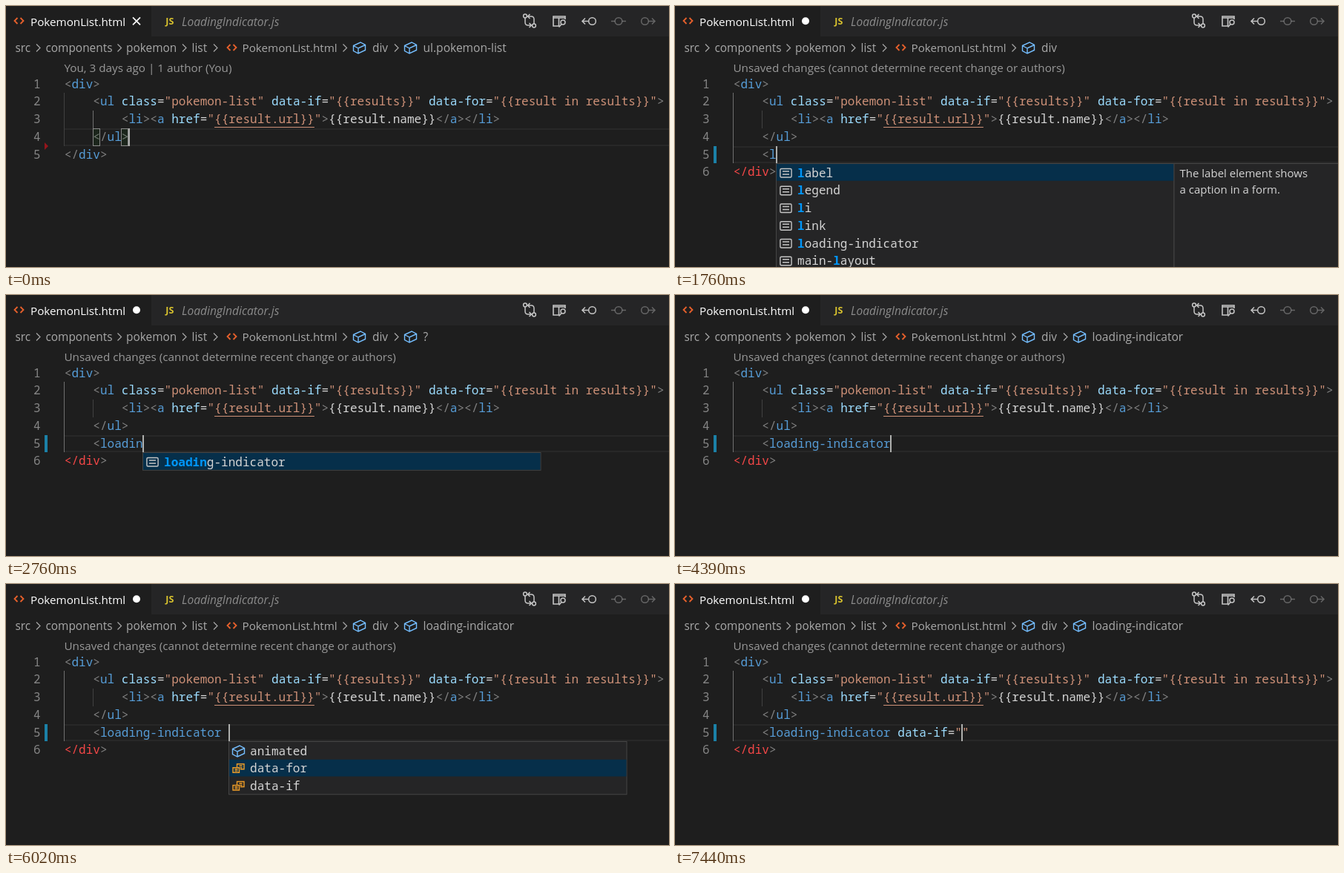
An HTML page for the animation above (7990 ms loop, 894 by 352 pixels).

```html
<!DOCTYPE html>
<html lang="en">
<head>
<meta charset="utf-8">
<title>Editor completion</title>
<style>
  html, body { margin: 0; width: 894px; height: 352px; overflow: hidden; background: #1e1e1e; }
  svg { display: block; }
  text { white-space: pre; }
  .ui { font-family: "Open Sans", "Noto Sans", sans-serif; }
  .code { font-family: "Noto Sans Mono", "DejaVu Sans Mono", monospace; font-size: 16.05px; }
</style>
</head>
<body>
<svg id="stage" width="894" height="352" viewBox="0 0 894 352"></svg>
<script>
const LOOP = 7990;
const CELL = 9.63, LEFT = 78.8, ROW = 23.75, TOP = 93.6;
const C = {
  punct: '#808080', tag: '#569cd6', attr: '#9cdcfe', str: '#ce9178',
  plain: '#d4d4d4', bad: '#f44747', crumb: '#a9a9a9', icon: '#c5c5c5',
  orange: '#e8612c', blue: '#75beff', match: '#0097fb'
};

const stage = document.getElementById('stage');
const colX = col => LEFT + CELL * col;
const rowY = row => Math.round(TOP + ROW * (row - 1));
const baseY = row => rowY(row) + 17;

function add(parent, name, attrs = {}, content) {
  const el = document.createElementNS('http://www.w3.org/2000/svg', name);
  for (const key in attrs) el.setAttribute(key, attrs[key]);
  if (content !== undefined) el.textContent = content;
  parent.appendChild(el);
  return el;
}
const rect = (p, x, y, width, height, fill, more) =>
  add(p, 'rect', { x, y, width, height, fill, ...more });
const stroke = (p, d, color, width = 1.3, more) =>
  add(p, 'path', { d, fill: 'none', stroke: color, 'stroke-width': width, ...more });
const label = (p, x, y, size, fill, s, more) =>
  add(p, 'text', { class: 'ui', x, y, 'font-size': size, fill, ...more }, s);
const mono = (p, x, y, fill, s, more) =>
  add(p, 'text', { class: 'code', x, y, fill, ...more }, s);

// Tokens are [colour name, text] pairs laid on the character grid.
function codeLine(p, row, col, tokens) {
  for (const [kind, s] of tokens) {
    mono(p, colX(col), baseY(row), C[kind], s);
    col += s.length;
  }
}

function angles(p, cx, cy) {
  stroke(p, `M${cx - 2} ${cy - 4}l-4 4l4 4M${cx + 2} ${cy - 4}l4 4l-4 4`, C.orange, 1.8);
}
function chevron(p, x) {
  stroke(p, `M${x - 2.5} 51.5l5 5l-5 5`, C.crumb, 1.2);
}
function cube(p, cx, cy) {
  stroke(p, `M${cx - 8} ${cy - 2.5}l9.5 -4.5l6.5 3.5v7l-9.5 4.5l-6.5 -3.5z` +
    `M${cx - 8} ${cy - 2.5}l6.5 3.5l9.5 -4.5M${cx - 1.5} ${cy + 1}v7`, C.blue, 1.4);
}
function keywordIcon(p, cx, cy) {
  rect(p, cx - 7.6, cy - 5.5, 15.2, 11.5, 'none', { rx: 1.5, stroke: C.icon, 'stroke-width': 1.4 });
  stroke(p, `M${cx - 4.5} ${cy - 2}h9M${cx - 4.5} ${cy + 2}h9`, C.icon);
}
function valueIcon(p, cx, cy) {
  stroke(p, `M${cx - 2} ${cy - 1}v-5h9.5v7h-5M${cx - 7.5} ${cy - 1}h8.5v6.5h-8.5z` +
    `M${cx + 1} ${cy - 3.5}h4M${cx + 2} ${cy - 1}h3M${cx - 5} ${cy + 1.2}h4M${cx - 5} ${cy + 3.4}h4`,
    '#ee9d28', 1.4);
}

function drawToolbar(p) {
  const dim = { opacity: .4 };
  stroke(p, 'M700 15.5v6.5q0 4 4 4h4M705.5 23l3 3l-3 3M712 24v-6q0 -4 -4 -4h-4M706.5 11l-3 3l3 3', C.icon, 1.5);
  for (const [x, y] of [[700, 13.5], [712, 26.5]])
    add(p, 'circle', { cx: x, cy: y, r: 2.4, fill: 'none', stroke: C.icon, 'stroke-width': 1.5 });
  stroke(p, 'M746 27h-8v-13h16v4M738 16h16M745.5 16v11', C.icon, 1.6);
  add(p, 'circle', { cx: 751, cy: 22, r: 3, fill: 'none', stroke: C.icon, 'stroke-width': 1.5 });
  stroke(p, 'M749 24.5l-3.5 4', C.icon, 1.6);
  const ring = (cx, more) =>
    add(p, 'circle', { cx, cy: 20.5, r: 4.8, fill: 'none', stroke: C.icon, 'stroke-width': 1.5, ...more });
  ring(790.5);
  stroke(p, 'M785.5 20.5h-8.500M781 16.5l-4 4l4 4', C.icon, 1.5);
  ring(826, dim);
  stroke(p, 'M816 20.5h5M831 20.5h5', C.icon, 1.5, dim);
  ring(861.5, dim);
  stroke(p, 'M866.5 20.5h8.500M871 16.5l4 4l-4 4', C.icon, 1.5, dim);
}

function drawFixed(p) {
  rect(p, 0, 0, 894, 352, '#1e1e1e');
  rect(p, 196, 0, 698, 41, '#252526');
  angles(p, 17.5, 20);
  label(p, 33, 26.5, 15.2, '#ffffff', 'PokemonList.html');
  label(p, 215.3, 24.5, 12.5, '#d9c32e', 'JS', { 'font-weight': 700 });
  label(p, 237, 26.5, 15.6, '#8b8b8b', 'LoadingIndicator.js', { 'font-style': 'italic' });
  drawToolbar(p);

  const crumbs = [[12.5, 'src'], [53.5, 'components'], [162, 'pokemon'], [250.5, 'list'], [494, 'div']];
  for (const [x, s] of crumbs) label(p, x, 61.7, 15.4, C.crumb, s);
  label(p, 318.5, 61.7, 15.2, C.crumb, 'PokemonList.html');
  angles(p, 304.5, 56);
  [43.5, 153, 240.5, 282.5, 457].forEach(x => chevron(p, x));
  cube(p, 476.5, 56);

  codeLine(p, 1, 0, [['punct', '<'], ['tag', 'div'], ['punct', '>']]);
  codeLine(p, 2, 4, [['punct', '<'], ['tag', 'ul'], ['attr', ' class'], ['plain', '='],
    ['str', '"pokemon-list"'], ['attr', ' data-if'], ['plain', '='], ['str', '"{{results}}"'],
    ['attr', ' data-for'], ['plain', '='], ['str', '"{{result in results}}"'], ['punct', '>']]);
  codeLine(p, 3, 8, [['punct', '<'], ['tag', 'li'], ['punct', '><'], ['tag', 'a'], ['attr', ' href'],
    ['plain', '='], ['str', '"{{result.url}}"'], ['punct', '>'], ['plain', '{{result.name}}'],
    ['punct', '</'], ['tag', 'a'], ['punct', '></'], ['tag', 'li'], ['punct', '>']]);
  rect(p, colX(21), 163, CELL * 14, 1, C.str);
  codeLine(p, 4, 4, [['punct', '</'], ['tag', 'ul'], ['punct', '>']]);
}

// Indices of the letters of query, in order, within a word.
function matches(word, query) {
  let at = -1;
  return [...query].map(ch => at = word.indexOf(ch, at + 1));
}

function drawPopup(p, x, { items, query = '', sel = 0, icon = keywordIcon, docs }) {
  const y = 212, h = items.length * ROW + 1, w = 536.5;
  const frame = { stroke: '#454545', 'stroke-width': 1 };
  rect(p, x + .5, y + .5, w, h - 1, '#252526', frame);
  rect(p, x + 1, y + 1 + sel * ROW, w - 1, ROW - 1, '#062f4a');
  items.forEach((word, i) => {
    const cy = y + 13 + i * ROW;
    (word === 'animated' ? cube : icon)(p, x + 13.5, cy);
    const hit = matches(word, query);
    const line = mono(p, x + 29, Math.round(cy + 5.6), C.plain, '');
    [...word].forEach((ch, k) => {
      const look = hit.includes(k) ? { fill: C.match, 'font-weight': 700 } : {};
      add(line, 'tspan', look, ch);
    });
  });
  if (docs) {
    rect(p, x + w + .5, y + .5, 300, h - 1, '#252526', frame);
    docs.forEach((s, i) => label(p, x + w + 8, y + 19 + i * 22, 15, C.plain, s));
  }
}

const both = ['loading-indicator', 'main-layout'];
const one = [both[0]];
const attrs = ['animated', 'data-for', 'data-if'];
const start = {
  entered: false, marked: false, typed: false, tag: '', attr: '', eq: '', quotes: '',
  col: 9, caret: true, crumb: 'ul.pokemon-list', unsaved: false, popup: null
};
const type = (tag, items, query = tag) => ({ tag, col: 5 + tag.length, popup: { items, query } });
const attrList = sel => ({ popup: { items: attrs, sel, icon: valueIcon } });

const steps = [
  [0, {}],
  [330, { caret: false }],
  [860, { caret: true }],
  [1070, { entered: true, col: 4 }],
  [1300, { marked: true, crumb: '' }],
  [1420, { typed: true, col: 5 }],
  [1540, { popup: { items: [...both, 'pokemon-list', 'a', 'abbr', 'address'] } }],
  [1640, { unsaved: true }],
  [1760, { tag: 'l', col: 6, popup: {
    items: ['label', 'legend', 'li', 'link', ...both], query: 'l',
    docs: ['The label element shows', 'a caption in a form.'] } }],
  [1860, { crumb: '?' }],
  [2080, type('lo', both)],
  [2200, type('loa', both, 'lo')],
  [2420, type('load', one)],
  [2540, type('loadi', one)],
  [2760, type('loadin', one)],
  [3080, type('loading', one)],
  [3410, { crumb: 'loading' }],
  [3510, { caret: false }],
  [3940, { tag: one[0], col: 22, caret: true, popup: null }],
  [4390, { crumb: one[0] }],
  [4490, { caret: false }],
  [4820, { col: 23, caret: true }],
  [4920, attrList(0)],
  [5270, { caret: false }],
  [5800, { caret: true }],
  [6020, attrList(1)],
  [6140, attrList(2)],
  [6260, { caret: false }],
  [6790, { attr: 'data-if', col: 30, caret: true, popup: null }],
  [7220, { eq: '=', col: 31 }],
  [7440, { quotes: '""', col: 32 }]
];
let last = start;
const states = steps.map(([, change]) => last = { ...last, ...change });

function drawState(p, s) {
  p.replaceChildren();
  const row = s.entered ? 5 : 4;
  const end = row + 1;
  const top = rowY(row), bottom = rowY(end);

  if (s.entered) {
    add(p, 'circle', { cx: 176, cy: 20.3, r: 5, fill: '#ffffff' });
  } else {
    stroke(p, 'M171 15.3l10 10M181 15.3l-10 10', '#ffffff', 1.7);
  }
  if (s.crumb) {
    chevron(p, 526.5);
    cube(p, 545.5, 56);
    label(p, 562.5, 61.7, 15.55, C.crumb, s.crumb);
  }
  label(p, 78.5, 89, 15.25, '#999999', s.unsaved
    ? 'Unsaved changes (cannot determine recent change or authors)'
    : 'You, 3 days ago | 1 author (You)');

  for (const y of [top, bottom - 2]) rect(p, 79, y, 815, 2, '#282828');
  rect(p, 78, rowY(2), 1, bottom - rowY(2), s.entered ? '#707070' : '#404040');
  rect(p, 117, rowY(3), 1, rowY(4) - rowY(3), s.entered ? '#404040' : '#707070');
  for (let n = 1; n <= end; n++)
    mono(p, 46.5, baseY(n), '#858585', n, { 'text-anchor': 'end' });

  if (s.marked) rect(p, 52, top, 4, bottom - top, '#1b81a8');
  else add(p, 'path', { d: 'M52 184l5 5l-5 5z', fill: '#94151b' });

  if (!s.entered) {
    for (const col of [4, 8])
      rect(p, Math.floor(colX(col)) + .5, top + .5, 9, 23, 'rgba(0,100,0,.1)', { stroke: '#888888' });
  }
  if (s.typed) {
    codeLine(p, 5, 4, [[s.tag ? 'punct' : 'bad', '<'], ['tag', s.tag], ['attr', ' ' + s.attr],
      ['plain', s.eq], ['str', s.quotes]]);
  }
  const close = s.unsaved ? ['bad', 'bad'] : ['punct', 'tag'];
  codeLine(p, end, 0, [[close[0], '</'], [close[1], 'div'], ['punct', '>']]);

  const x = Math.floor(colX(s.col));
  if (s.popup) drawPopup(p, x, s.popup);
  if (s.caret) rect(p, x, top, 2, bottom - top, '#aeafad');
}

drawFixed(add(stage, 'g'));
const live = add(stage, 'g');
const origin = performance.now();
let shown = -1;

function tick() {
  const t = (performance.now() - origin) % LOOP;
  const now = steps.findLastIndex(([at]) => at <= t);
  if (now !== shown) drawState(live, states[shown = now]);
  requestAnimationFrame(tick);
}
tick();
</script>
</body>
</html>
```
